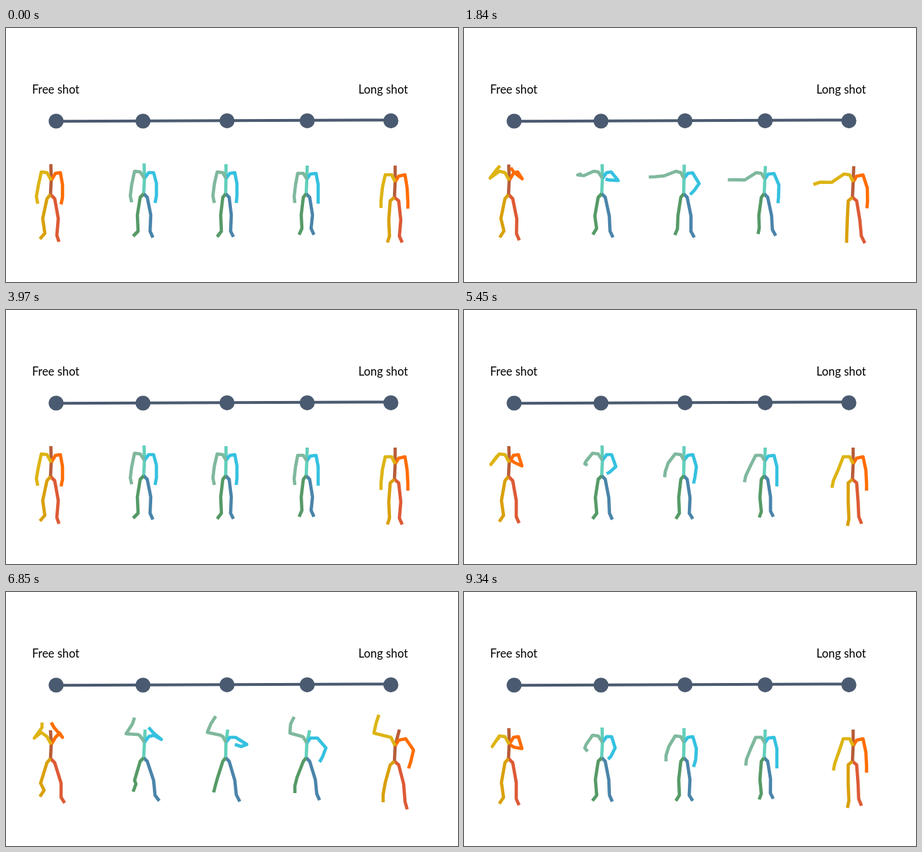
An HTML page for the animation above (9.38 s loop, 640 by 360 pixels).

```html
<!DOCTYPE html>
<html lang="en">
<head>
<meta charset="utf-8">
<title>Free shot to long shot</title>
<style>
  html, body { margin: 0; width: 100%; height: 100%; overflow: hidden; background: #fff; }
  svg { display: block; width: 100vw; height: 100vh; }
  text { font: 16.4px Lato, Carlito, sans-serif; fill: #000; }
  polyline { fill: none; stroke-width: 4.6; stroke-linejoin: round; }
</style>
</head>
<body>
<svg id="stage" viewBox="0 0 640 360">
  <text x="37" y="93">Free shot</text>
  <text x="499" y="93">Long shot</text>
  <path d="M71 132.3L545 130.4" stroke="#4a5a70" stroke-width="4"/>
</svg>
<script>
const LOOP = 9380, CYCLE = 3970, MOVE = 2880, STEP = 40;
const ARM_TIMES = [0, 1160, 1400, 1480, 2440, 2880];
const LEG_TIMES = [0, 1480, 2440, 2880];
const BODY_TIMES = [1480, 2440, 2880];

// spine, left arm, right arm, left leg, right leg
const WARM = ['#b85c38', '#ddb414', '#ff6d00', '#d9a00c', '#dd5a35'];
const COOL = ['#62cfbb', '#7fb89d', '#35c1e0', '#559a66', '#4a84aa'];

const svg = document.getElementById('stage');

function add(tag, attrs) {
  const el = document.createElementNS(svg.namespaceURI, tag);
  for (const k in attrs) el.setAttribute(k, attrs[k]);
  return svg.appendChild(el);
}

const points = s => s.split(' ').map(p => p.split(',').map(Number));

// Monotone cubic through the given keys, clamped at both ends.
function track(times, values) {
  const last = times.length - 1;
  const rate = values.slice(1).map((v, i) => (v - values[i]) / (times[i + 1] - times[i]));
  const slope = values.map((_, i) => {
    const a = rate[i - 1], b = rate[i];
    return i > 0 && i < last && a * b > 0 ? 2 * a * b / (a + b) : 0;
  });
  return t => {
    if (t <= times[0]) return values[0];
    if (t >= times[last]) return values[last];
    let i = 0;
    while (t >= times[i + 1]) i++;
    const h = times[i + 1] - times[i], u = (t - times[i]) / h, w = 1 - u;
    return w * w * ((1 + 2 * u) * values[i] + u * h * slope[i])
         + u * u * ((3 - 2 * u) * values[i + 1] - w * h * slope[i + 1]);
  };
}

function pointTrack(times, list) {
  const x = track(times, list.map(p => p[0]));
  const y = track(times, list.map(p => p[1]));
  return t => [x(t), y(t)];
}

// Joint chain that swings by angle and length from a moving root.
function chain(times, root, poses) {
  const rows = poses.map((s, k) => [root(times[k]), ...points(s)]);
  const bones = rows[0].slice(1).map((_, j) => {
    const lens = [], angles = [];
    rows.forEach((row, k) => {
      const dx = row[j + 1][0] - row[j][0], dy = row[j + 1][1] - row[j][1];
      let a = Math.atan2(dy, dx) * 180 / Math.PI;
      if (k) {
        while (a - angles[k - 1] > 205) a -= 360;
        while (a - angles[k - 1] <= -155) a += 360;
      }
      lens.push(Math.hypot(dx, dy));
      angles.push(a);
    });
    return { len: track(times, lens), angle: track(times, angles) };
  });
  return t => {
    const out = [root(t)];
    bones.forEach(({ len, angle }, j) => {
      const a = angle(t) * Math.PI / 180, r = len(t), [x, y] = out[j];
      out.push([x + r * Math.cos(a), y + r * Math.sin(a)]);
    });
    return out;
  };
}

// core: chest, pelvis, collars, hips. body: head and shoulders per key.
function figure(colors, { core, body, arms, legs }) {
  const [chest, pelvis, collarL, collarR, hipL, hipR] = points(core);
  const poses = body.map(points);
  const [head, shL, shR] = [0, 1, 2].map(j => pointTrack(BODY_TIMES, poses.map(p => p[j])));
  const [armL, armR] = [shL, shR].map((s, j) => chain(ARM_TIMES, s, arms[j]));
  const [legL, legR] = [hipL, hipR].map((h, j) => chain(LEG_TIMES, () => h, legs[j]));
  const parts = [
    t => [head(t), chest, pelvis],
    t => [chest, collarL, ...armL(t)],
    t => [chest, collarR, ...armR(t)],
    t => [pelvis, ...legL(t)],
    t => [pelvis, ...legR(t)]
  ];
  const lines = [];
  for (const i of [0, 4, 3, 2, 1]) lines[i] = add('polyline', { stroke: colors[i] });
  return t => parts.forEach((f, i) =>
    lines[i].setAttribute('points', f(t).map(p => p.map(v => v.toFixed(2))).join(' ')));
}

[[71, 132], [194, 132], [313, 131.6], [426.5, 131.6], [545, 131.6]]
  .forEach(([cx, cy]) => add('circle', { cx, cy, r: 10.6, fill: '#4a5a70' }));

const figures = [
  figure(WARM, {
    core: '64,216 63,236 58,205 70,206 58,242 69,242',
    body: ['63.5,193 50,204 77,205', '63,195 51,200 74,201', '63,196 50,199 76,200'],
    arms: [
      ['46,222 43,239 45,249', '42,223 41,236 45,243', '40,219 46,210 50,206',
       '38,219 47,207 51,204', '41,204 52,190 54,182', '40,207 51,192 51,185'],
      ['80,222 80,240 78,250', '82,223 78,238 74,247', '82,222 71,220 66,217',
       '82,221 71,216 66,212', '79,204 67,190 64,182', '80,206 68,192 64,185']
    ],
    legs: [
      ['52,270 55,291 48,299', '53,270 56,291 50,300', '50,270 55,280 49,290', '49,271 54,281 48,290'],
      ['74,270 72,294 75,303', '74,270 74,293 78,302', '77,271 76,289 80,299', '78,271 78,291 83,299']
    ]
  }),
  figure(COOL, {
    core: '196,213 195,235 190,204 202,205 190,240 200,240',
    body: ['195.5,192 182,203 209,205', '196,195 187,203 207,202', '197,195 187,202 209,203'],
    arms: [
      ['178,222 176,238 178,247', '176,220 173,237 175,246', '173,216 171,221 175,226',
       '173,214 171,218 175,220', '170,201 179,185 184,177', '170,201 179,187 182,178'],
      ['213,220 213,238 211,248', '213,222 212,239 210,248', '214,221 208,233 204,237',
       '215,222 206,230 202,232', '217,206 206,196 200,190', '220,209 208,199 202,192']
    ],
    legs: [
      ['186,265 187,288 180,295', '186,266 188,288 182,296', '183,267 185,274 181,284', '182,267 184,272 180,283'],
      ['205,265 204,288 208,297', '205,266 206,288 210,297', '208,267 209,287 214,296', '209,267 211,288 217,296']
    ]
  }),
  figure(COOL, {
    core: '311.5,213 311,235 307,205 317,206 307,240 316,240',
    body: ['311.5,193 299,204 324,205', '313,195 303,201 323,206', '314,195 304,203 325,206'],
    arms: [
      ['295,221 293,238 295,248', '293,222 291,238 292,248', '290,219 286,232 286,240',
       '289,217 285,229 284,237', '284,197 291,186 297,175', '285,199 290,187 297,176'],
      ['327,221 327,238 326,248', '327,221 328,239 327,249', '329,222 328,238 325,248',
       '329,222 327,237 325,246', '339,214 331,217 324,214', '341,216 333,219 324,216']
    ],
    legs: [
      ['304,265 305,288 299,296', '304,266 305,288 300,296', '300,265 297,277 296,286', '299,265 296,276 294,284'],
      ['319,265 318,288 322,296', '320,266 319,288 324,296', '324,267 326,288 330,298', '324,267 326,287 331,297']
    ]
  }),
  figure(COOL, {
    core: '426,214 425,235 421,206 431,207 421,240 430,240',
    body: ['426.5,195 413,206 439,206', '428,197 417,203 439,207', '430,196 420,205 441,207'],
    arms: [
      ['410,222 408,239 409,248', '409,222 406,239 406,248', '406,222 400,237 399,246',
       '405,222 399,235 397,244', '397,198 403,186 408,176', '402,200 403,187 408,177'],
      ['442,222 442,240 442,249', '442,222 443,241 442,250', '443,222 443,241 443,250',
       '443,222 443,241 443,250', '452,221 450,234 447,242', '453,221 448,234 444,241']
    ],
    legs: [
      ['418,265 419,284 415,293', '419,266 421,286 418,294', '413,265 411,277 412,286', '412,263 409,275 409,285'],
      ['434,265 432,284 436,293', '434,265 434,285 438,293', '439,267 442,287 448,297', '438,266 440,286 444,295']
    ]
  }),
  figure(WARM, {
    core: '551,218 550,240 546,208 556,210 544,245 556,245',
    body: ['551,195 537,208 565,208', '555,198 541,205 565,209', '557,195 545,206 566,208'],
    arms: [
      ['533,226 531,245 531,255', '532,227 529,245 529,255', '531,226 525,243 523,253',
       '530,226 523,242 521,252', '519,198 524,184 528,174', '521,200 524,186 528,174'],
      ['568,227 569,246 569,256', '568,227 569,246 569,256', '569,227 570,246 570,256',
       '569,227 570,246 570,256', '576,226 574,243 571,253', '577,224 573,241 570,250']
    ],
    legs: [
      ['542,272 543,295 540,304', '544,272 545,296 543,306', '539,270 535,289 538,298', '537,270 534,287 534,298'],
      ['559,272 557,295 561,304', '558,272 559,293 563,303', '566,272 570,298 577,308', '563,272 565,297 568,308']
    ]
  })
];

function draw(ms) {
  const phase = Math.min(ms % LOOP % CYCLE, MOVE);
  const t = Math.floor(phase / STEP) * STEP;
  figures.forEach(f => f(t));
}

const start = performance.now();
function tick() {
  draw(performance.now() - start);
  requestAnimationFrame(tick);
}
draw(0);
requestAnimationFrame(tick);
</script>
</body>
</html>
```
